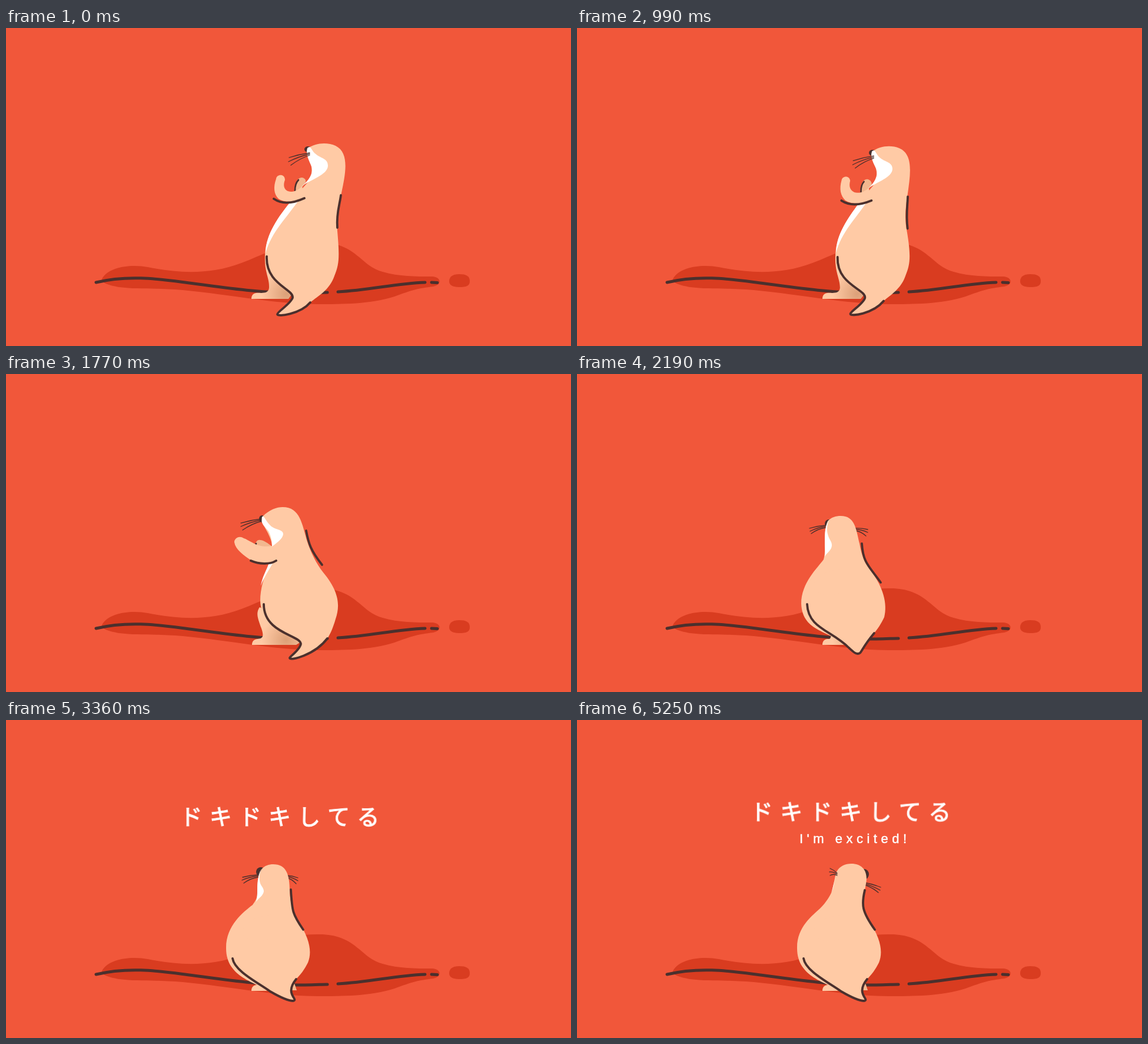
An HTML page that plays this animation: 960x540 px, repeating every 5.4 s.

```html
<!DOCTYPE html>
<html lang="ja">
<head>
<meta charset="utf-8">
<title>ドキドキしてる</title>
<style>
  html, body { margin: 0; width: 100%; height: 100%; overflow: hidden; background: #f1573a; }
  svg { display: block; width: 100vw; height: 100vh; }
  .shade { fill: #d93c20; }
  .fur { fill: #ffcaa5; }
  .far { fill: #f2b78f; }
  .white { fill: #fff; }
  .dark { fill: #48302d; }
  .line { fill: none; stroke: #4b302d; stroke-width: 3.8; stroke-linecap: round; stroke-linejoin: round; }
  .ground { stroke-width: 5; }
  .hair { stroke-width: 1.3; }
  .ja { font: 400 38px "Noto Sans CJK JP", "Noto Sans CJK", sans-serif; text-anchor: middle; fill: #fff; stroke: #fff; stroke-width: 1.1; }
  .en { font: 22px "Liberation Sans", sans-serif; letter-spacing: 6.5px; fill: #fff; stroke: #fff; stroke-width: .5; }
</style>
</head>
<body>
<svg viewBox="0 0 960 540">
  <defs>
    <radialGradient id="inner" gradientUnits="userSpaceOnUse" cx="476" cy="452" r="42">
      <stop offset="0" stop-color="#dca078"/>
      <stop offset="1" stop-color="#ffcaa5"/>
    </radialGradient>
  </defs>
  <path class="shade" d="M163 426C175 404 215 401 241 406C290 416 345 420 400 399C440 384 470 364 528 364C560 363 580 372 600 389C613 400 622 409 640 414C668 422 695 422 724 422C740 423 741 436 726 439C700 442 690 445 660 456C620 469 570 469 530 469C450 468 400 455 300 445C250 441 225 444 192 440C175 437 161 433 163 426Z"/>
  <path class="shade" d="M753 430C753 422 760 418 770 418C782 418 788 421 788 430C788 438 782 440 770 440C760 440 753 437 753 430Z"/>
  <path class="line ground" d="M153 432C205 419.5 255 425.5 300 431.5C360 439.5 430 450.5 500 450C525 450 535 449 546 449M564 448C620 445 660 434 712 432M723 432L733 432.5"/>
  <g id="animal"></g>
  <g id="ja" class="ja"></g>
  <text id="en" class="en" x="378" y="209">I'm excited!</text>
</svg>
<script>
const LOOP = 5400;
const svg = (tag, cls, parent) => {
  const el = document.createElementNS('http://www.w3.org/2000/svg', tag);
  el.setAttribute('class', cls);
  return parent.appendChild(el);
};
const byId = id => document.getElementById(id);

// steps: [time, value, easing to the next step]
const play = (el, prop, steps, easing = 'ease-in-out') => el.animate(
  steps.map(([t, v, e]) => ({ offset: t / LOOP, [prop]: v, easing: e || easing })),
  { duration: LOOP, iterations: Infinity });

// poses: 0 tall, 1 crouched, 2 arms lower, 3 turned away, 4 settling, 5 at rest, 6 looking right
const poses = [[0, 0], [90, 0], [540, 1], [660, 1], [1110, 0], [1200, 0], [1440, 2], [1770, 2],
  [2190, 3], [2460, 4], [2670, 4], [2850, 5], [3660, 5], [4200, 6], [LOOP, 6]];

const part = (cls, shapes) => {
  const el = svg('path', cls, byId('animal'));
  play(el, 'd', poses.map(([t, p]) => [t, `path("${shapes[Math.min(p, shapes.length - 1)]}")`]));
  return el;
};

const oval = (x, y, rx, ry) =>
  `M${x - rx} ${y}a${rx} ${ry} 0 1 0 ${2 * rx} 0a${rx} ${ry} 0 1 0 ${-2 * rx} 0Z`;

const fan = (x, y, ...tips) => tips.map(([a, b], i) =>
  `M${x} ${y + i * 2}Q${(x + a) / 2} ${(y + b) / 2 - 1.5} ${a} ${b}`).join('');
const tucked = (x, y) => fan(x, y, [x, y], [x, y], [x, y]);

// right whiskers
part('line hair', [
  tucked(545, 230), tucked(480, 260), tucked(480, 258),
  fan(473, 262, [494, 264], [494, 269], [491, 275]),
  fan(477, 266, [497, 270], [497, 275], [494, 280]),
  fan(477, 264, [496, 268], [496, 273], [493, 278]),
  fan(488, 276, [516, 284], [515, 289], [512, 293])
]);

// nose
part('dark', [
  oval(513, 206, 6, 5), oval(436, 247, 5, 6), oval(435, 246, 5, 6), oval(428, 254, 7, 7),
  oval(432, 258, 8, 8), oval(433, 258, 8, 8), oval(488, 262, 8, 9)
]);

// far arm and its line
part('far', [
  'M490 278C490 262 497 253 503 254C508 255 510 258 509 262L500 275Z',
  'M432 294C428 280 430 272 437 273C443 274 447 283 452 290L445 294Z',
  'M424 291C424 284 428 281 432 282C438 282 446 288 452 293L440 296Z',
  'M425 340C425 334 429 331 433 332C439 332 447 338 453 343L441 346Z'
]);
const farLine = part('line', [
  'M491 276C491 268 493 262 497 258',
  'M432 291C431 286 430 282 432 278',
  'M425 291C424 290 424 289 425 288',
  'M430 340C430 339 430 338 430 337'
]);
farLine.style.strokeWidth = 2.6;

// feet
const heel = svg('path', 'far', byId('animal'));
heel.setAttribute('d', 'M490 447L494 459L482 459Z');
play(heel, 'opacity', [[0, 0], [2250, 0], [2400, 1], [LOOP, 1]]);
part('', [
  'M440 388C439 415 448 425 447 441C446 453 432 449 425 450C419 451 417 455 417 460L480 460L487 450L470 420Z',
  'M433 385C432 415 440 428 446 441C446 453 432 449 425 450C419 451 417 455 417 460L495 460L503 455L470 415Z',
  'M431 396C424 406 428 415 434 432C439 447 436 449 427 450C420 451 418 455 418 460L493 460L501 455L470 415Z',
  'M420 430C420 435 430 440 432 444C430 451 430 450 425 450C419 451 417 455 417 460L455 460L470 455L470 440Z',
  'M412 430C415 435 428 440 432 444C430 451 430 450 425 450C419 451 417 455 417 460L442 460L460 455L460 440Z'
]).style.fill = 'url(#inner)';

// body with head and tail
part('fur', [
  'M512 205C526 194 547 194 560 200C584 212 577 247 570 280C563 315 562 330 563 345C567 390 566 402 558 421C550 445 530 455 517 466C500 486 461 491 461 486C461 482 484 468 487 458C489 443 441 435 440 390C440 350 465 318 482 297C495 280 512 265 517 256C523 240 517 225 511 212Z',
  'M437 243C450 230 462 228 472 228C502 228 504 258 514 290C519 309 531 327 546 345C572 375 567 400 560 416C556 430 551 442 545 449C522 481 485 488 485 482C485 478 502 470 503 459C502 444 436 445 433 395C432 365 440 340 450 317C452 300 452 295 452 290C452 278 440 262 435 250Z',
  'M436 242C448 230 460 226 470 226C500 226 503 255 512 285C518 303 527 322 539 337C568 372 567 395 560 416C556 430 551 442 546 449C525 477 482 488 482 482C482 478 500 468 501 458C499 443 434 442 432 385C432 365 438 345 448 320C450 305 452 298 452 292C452 279 440 262 434 250Z',
  'M426 250C432 243 440 241 448 241C472 241 474 262 480 288C484 310 489 322 500 335C520 362 528 390 522 413C517 424 510 434 505 440C480 470 485 474 477 475C473 475 471 473 462 465C432 435 383 440 381 390C381 355 408 330 419 315C421 308 421 303 421 298C421 275 421 262 426 250Z',
  'M432 255C438 247 446 245 453 245C475 245 481 262 482 290C484 312 489 328 497 341C518 372 521 395 514 412C509 424 503 431 497 437C473 466 498 473 487 476C482 476 468 472 449 461C425 446 375 437 375 388C374 350 404 326 420 314C423 308 426 303 426 295C426 275 427 262 432 255Z',
  'M434 254C439 247 447 245 454 245C476 245 482 262 482 290C483 312 488 328 496 341C517 372 520 395 513 412C507 424 500 433 493 440C472 466 498 474 488 477C482 477 468 472 449 461C425 446 374 437 374 388C373 350 403 326 419 314C423 308 427 303 427 295C427 275 429 262 434 254Z',
  'M441 258C446 248 456 244 466 244C486 244 495 258 491 278C487 300 482 322 496 341C517 372 520 395 513 412C507 424 500 433 493 440C472 466 498 474 488 477C482 477 468 472 449 461C425 446 374 437 374 388C373 352 400 332 413 320C423 310 430 299 433 291C436 282 437 270 441 258Z'
]);

// belly
part('white', [
  'M441 382C441 350 465 318 482 297L499 290C475 325 452 345 441 382Z',
  'M434 380C434 355 442 340 450 316L462 316C450 335 440 350 434 380Z',
  'M433 360C435 345 442 335 448 318L456 316C446 335 438 345 433 360Z',
  'M383 375C388 355 400 340 415 320L415 320C400 340 388 355 383 375Z'
]);

// face
part('white', [
  'M512 204C518 198 519 208 525 213C535 222 547 221 547 234C546 250 519 256 501 270C514 260 523 247 519 235C515 225 509 215 512 204Z',
  'M436 244C440 240 441 252 448 258C456 266 471 264 471 272C470 280 464 286 452 291C453 282 450 275 446 266C440 258 434 255 436 244Z',
  'M435 243C438 238 441 250 449 257C456 265 471 263 471 272C470 280 462 285 452 293C452 282 450 275 446 267C440 259 432 254 435 243Z',
  'M428 248C425 255 424 264 426 272C428 281 433 284 433 291C433 299 424 304 421 310C422 300 421 294 421 287C421 270 421 258 428 248Z',
  'M433 252C430 258 430 266 430 273C432 282 437 284 437 291C436 299 427 303 425 309C426 300 427 296 426 288C426 272 428 260 433 252Z',
  'M435 251C431 257 430 266 431 273C432 282 438 284 438 291C437 299 428 303 425 309C427 300 427 296 427 288C427 272 429 260 435 251Z',
  'M441 258C439 264 438 270 437 276C436 284 434 289 432 293C430 298 427 303 425 306C427 303 430 298 432 293C434 289 438 270 441 258Z'
]);

// near arm
part('fur', [
  'M503 269C495 276 488 280 479 277C470 273 472 263 474 258C474 247 460 248 459 256C454 270 455 282 463 290C475 298 495 295 508 288Z',
  'M452 289C440 293 428 294 419 287C411 280 409 275 406 269C401 265 394 268 394 273C395 290 403 302 416 310C430 317 445 319 462 317Z',
  'M452 292C440 294 428 292 420 287C412 283 408 280 404 279C396 273 387 280 388 286C390 298 404 308 416 316C430 322 448 324 460 317Z',
  'M450 330C445 332 435 332 430 335C425 336 415 340 412 345C405 350 402 355 402 360C403 370 410 372 420 375C430 378 440 375 450 370Z'
]);
const armLine = part('line', [
  'M455 290C468 299 485 299 507 289',
  'M416 311C430 317 444 319 461 317',
  'M416 317C430 323 448 324 459 317',
  'M416 373C425 377 438 377 450 370'
]);
for (const el of [farLine, armLine]) {
  play(el, 'opacity', [[0, 1], [1770, 1], [1980, 0], [LOOP, 0]]);
}

// back, then thigh and tail
part('line', [
  'M569 284C567 300 561 315 563 339',
  'M521 300C529 318 545 333 554 350',
  'M510 266C514 288 518 300 537 324',
  'M484 288C486 320 495 325 516 354',
  'M484 288C486 325 487 330 508 359',
  'M484 288C486 325 487 330 505 356',
  'M489 289C483 314 484 325 506 356'
]);
part('line', [
  'M443 388C441 435 489 443 487 458C484 468 461 482 461 486C461 491 500 486 517 466',
  'M441 395C441 442 502 444 503 459C502 470 485 478 485 482C485 488 522 481 545 449',
  'M438 391C438 440 499 443 501 458C500 468 482 480 482 482C482 488 525 477 546 449',
  'M391 391C393 432 432 435 462 465C471 473 473 475 477 475C485 474 480 470 505 440',
  'M386 405C389 426 428 446 449 461C468 472 482 476 487 476C498 473 473 466 497 437',
  'M385 405C388 426 428 446 449 461C468 472 482 477 488 477C498 474 472 466 493 440'
]);

// left whiskers
part('line hair', [
  fan(516, 212, [481, 220], [480, 227], [484, 233]),
  fan(435, 248, [400, 257], [400, 263], [405, 267]),
  fan(434, 246, [399, 253], [399, 259], [402, 265]),
  fan(422, 257, [395, 262], [396, 267], [398, 271]),
  fan(428, 263, [402, 267], [401, 273], [405, 277]),
  fan(428, 263, [402, 267], [401, 272], [404, 277]),
  fan(442, 260, [430, 252], [429, 258], [430, 264])
]);

// caption: letters spread from the middle, then the line rises
const ja = byId('ja');
[...'ドキドキしてる'].forEach((ch, i) => {
  const el = svg('text', '', ja);
  el.textContent = ch;
  const at = pitch => `translate(${465 + (i - 3) * pitch}px, 0px)`;
  play(el, 'transform', [[0, at(14)], [2730, at(14), 'cubic-bezier(.2,.6,.3,1)'], [3480, at(50.4)], [LOOP, at(50.4)]]);
});
const rise = y => `translate(0px, ${y}px)`;
play(ja, 'transform', [[0, rise(186.5)], [3150, rise(186.5)], [3570, rise(169.5)], [LOOP, rise(169.5)]]);
play(ja, 'opacity', [[0, 0], [2730, 0], [2910, 1], [LOOP, 1]]);
play(byId('en'), 'opacity', [[0, 0], [3450, 0], [3840, 1], [LOOP, 1]]);
</script>
</body>
</html>
```
